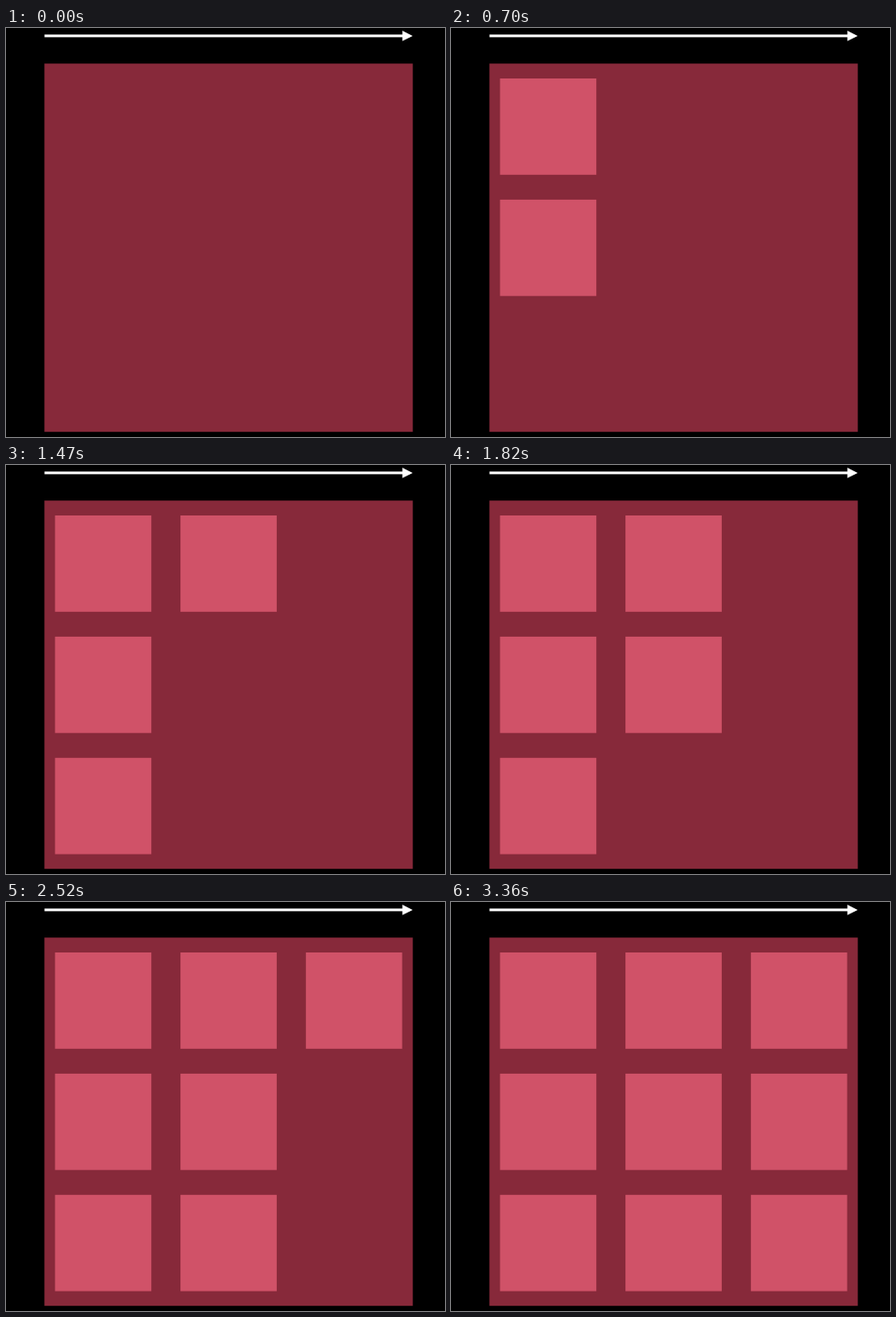
Recreate the animation shown at these times as an HTML page with a canvas. Size 496 by 462 pixels, loop 3710 ms.

```html
<!DOCTYPE html>
<html lang="en">
<head>
<meta charset="utf-8">
<title>Grid filling by column</title>
<style>
  html, body { margin: 0; width: 100%; height: 100%; overflow: hidden; background: #000; }
  canvas { display: block; }
</style>
</head>
<body>
<canvas id="stage" width="496" height="462"></canvas>
<script>
const ctx = document.getElementById('stage').getContext('2d');
const LOOP = 3710;
const ROWS = 3;
const SIZE = 108.8;
const PITCH_X = 141.7;
const PITCH_Y = 136.9;
// Moment at which each tile appears, running down the columns
const starts = [70, 560, 1120, 1470, 1820, 2170, 2520, 2870, 3220];

function rect(x, y, w, h, color) {
  ctx.fillStyle = color;
  ctx.fillRect(x, y, w, h);
}

function drawArrow() {
  rect(43.5, 7.4, 405, 3, '#fff');
  ctx.beginPath();
  ctx.moveTo(447.8, 3);
  ctx.lineTo(459.5, 8.9);
  ctx.lineTo(447.8, 14.8);
  ctx.fill();
}

function draw(t) {
  rect(0, 0, 496, 462, '#000');
  drawArrow();
  rect(43.4, 40.2, 416.2, 416, '#87293a');
  starts.forEach((start, i) => {
    if (t < start) return;
    const col = Math.floor(i / ROWS);
    const row = i % ROWS;
    rect(55.4 + col * PITCH_X, 57 + row * PITCH_Y, SIZE, SIZE, '#d05268');
  });
}

const origin = performance.now();

function tick() {
  draw((performance.now() - origin) % LOOP);
  requestAnimationFrame(tick);
}

tick();
</script>
</body>
</html>
```
